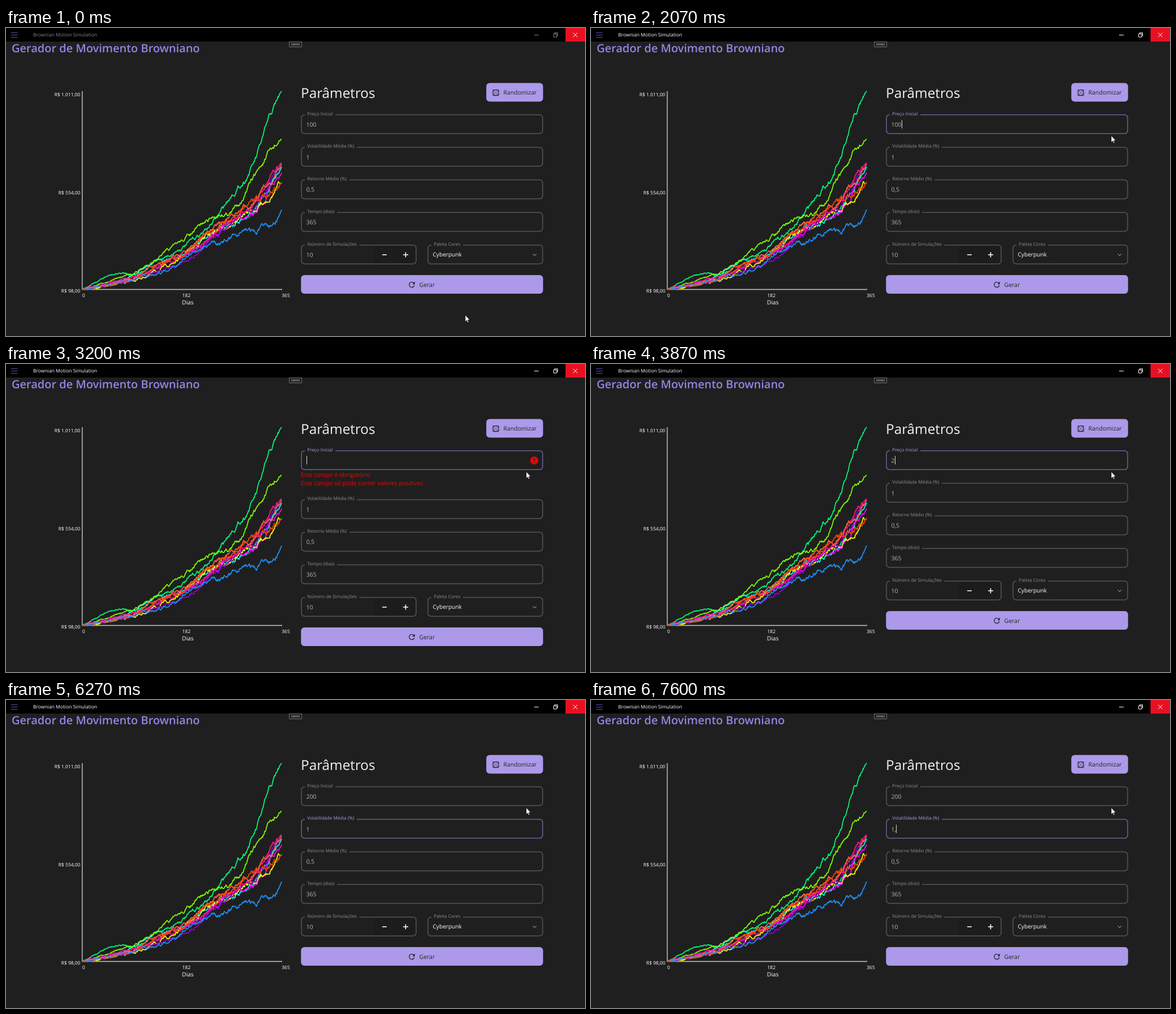
An HTML page for the animation above (8000 ms loop, 1025 px wide and 546 px high).

```html
<!DOCTYPE html>
<html lang="pt">
<head>
<meta charset="utf-8">
<title>Brownian Motion Simulation</title>
<style>
  html, body { margin: 0; width: 100%; height: 100%; overflow: hidden; background: #1f1f1f; }
  svg { display: block; width: 100vw; height: 100vh; font: 10.5px "Open Sans", "Noto Sans", sans-serif; text-rendering: geometricPrecision; }
  .axis { font-size: 8.5px; fill: #fff; }
  .end { text-anchor: end; }
  .label { font-size: 8.1px; fill: #8f8f8f; }
  .value { fill: #b4b4b4; }
  .box { fill: none; stroke: #555; stroke-width: 1.5; }
  .focus .box { stroke: #6c6095; }
  .focus .label { fill: #ac99ea; }
  .error { fill: #f00; }
  .line { fill: none; stroke-width: 1.7; stroke-linejoin: round; }
  .button { fill: #ac99ea; }
  .dark { fill: #242424; }
</style>
</head>
<body>
<svg viewBox="0 0 1025 546">
  <rect width="1025" height="546" fill="#1f1f1f"/>
  <rect width="1025" height="24"/>
  <path d="M9 8.5H20.5M9 12.5H20.5M9 16.5H20.5" stroke="#6650b0" stroke-width="1.1"/>
  <text id="caption" x="48" y="15" font-size="8.55">Brownian Motion Simulation</text>
  <g id="controls" fill="none">
    <path d="M935 12.5H943"/>
    <path d="M969.5 10.5H975V16H969.5ZM971 10V8.5H976.5V14H975.5"/>
  </g>
  <rect x="990.5" width="34.5" height="24" fill="#e81123"/>
  <path d="M1004 8.5L1011.5 16M1011.5 8.5L1004 16" stroke="#fff"/>
  <rect x="501.5" y="24.5" width="22" height="9" fill="#1f1f1f" stroke="#707070"/>
  <rect x="505" y="27" width="15" height="4" fill="#585858"/>
  <text x="10" y="43" font-size="20" font-weight="600" fill="#9880e5">Gerador de Movimento Browniano</text>

  <path d="M135 112V464M134.5 463.5H489" stroke="#c8c8c8" stroke-width="1.4"/>
  <g id="chart"></g>
  <g class="axis">
    <g class="end">
      <text x="131.5" y="121">R$ 1.011,00</text>
      <text x="131.5" y="294.5">R$ 554,00</text>
      <text x="131.5" y="468.5">R$ 98,00</text>
    </g>
    <text x="135" y="477">0</text>
    <text x="312" y="477">182</text>
    <text x="488" y="477">365</text>
    <text x="311.5" y="489.5" font-size="10.2">Dias</text>
  </g>

  <text x="522" y="123.7" font-size="24.3" fill="#f2f2f2">Parâmetros</text>
  <rect class="button" x="850.25" y="97.5" width="100.5" height="33" rx="6"/>
  <rect x="862.2" y="109.7" width="9.8" height="9.8" rx="1" fill="none" stroke="#242424" stroke-width="1.3"/>
  <path d="M864.6 112.1h0M869.6 112.1h0M867.1 114.6h0M864.6 117.1h0M869.6 117.1h0" stroke="#242424" stroke-width="1.8" stroke-linecap="round"/>
  <text class="dark" x="880.5" y="118.3">Randomizar</text>

  <g id="form"></g>
  <g id="submit">
    <rect class="button" x="522.25" y="438" width="428.5" height="33" rx="6"/>
    <path class="dark" transform="translate(710.5 447) scale(.667)" d="M17.65 6.35A7.96 7.96 0 0 0 12 4a8 8 0 1 0 7.73 10h-2.08A6 6 0 1 1 12 6c1.66 0 3.14.69 4.22 1.78L13 11h7V4z"/>
    <text class="dark" x="731.5" y="458.7">Gerar</text>
  </g>

  <g id="errors" class="error">
    <circle cx="935" cy="18" r="7"/>
    <path d="M935 14V19M935 20.6V22.2" stroke="#1f1f1f" stroke-width="1.6"/>
    <text x="522" y="47.2">Este campo é obrigatório</text>
    <text id="rule" x="522" y="61.5"></text>
  </g>
  <rect id="caret" width="1" height="15" fill="#d8d8d8"/>
  <path id="arrow" d="M0 0V11.6L2.6 9.2L4.3 13.2L6.1 12.5L4.4 8.6H8Z" fill="#fff" stroke="#000" stroke-width=".6"/>
  <path id="beam" d="M-3 -7.5H-.7L0 -7L.7 -7.5H3M0 -7V7M-3 7.5H-.7L0 7L.7 7.5H3" fill="none" stroke="#fff"/>
</svg>
<script>
const el = id => document.getElementById(id);

// Price curves: evenly spaced heights, roughened by seeded noise
const curves = {
  '#00ffff': [463, 456, 440, 412, 402, 372, 343, 320, 246],
  '#ff00ff': [463, 456, 444, 425, 404, 378, 341, 328, 256],
  '#ffff00': [463, 458, 450, 431, 408, 368, 345, 320, 275],
  '#00ff7f': [463, 451, 440, 435, 436, 428, 412, 402, 388, 374, 356, 331, 294, 270, 229, 163, 112],
  '#9400d3': [463, 457, 445, 430, 416, 383, 341, 316, 242],
  '#7fff00': [463, 456, 449, 442, 437, 424, 407, 395, 377, 361, 343, 329, 326, 296, 257, 224, 197],
  '#ff1493': [463, 453, 442, 422, 402, 372, 345, 309, 239],
  '#ff6347': [463, 455, 443, 419, 401, 362, 335, 305, 241],
  '#ff4500': [463, 457, 447, 424, 403, 366, 338, 308, 273],
  '#1e90ff': [463, 460, 455, 450, 446, 440, 434, 427, 411, 396, 385, 384, 369, 357, 361, 348, 322]
};
let seed = 7;
const random = () => (seed = seed * 16807 % 2147483647) / 2147483647;

function curvePath(knots) {
  const days = 365, points = [];
  let noise = 0;
  for (let d = 0; d <= days; d++) {
    const p = d / days * (knots.length - 1), k = Math.min(Math.floor(p), knots.length - 2);
    noise = noise * .9 + (random() - .5) * (1 + 6 * d / days);
    const y = knots[k] + (knots[k + 1] - knots[k]) * (p - k) + noise * Math.min(1, (days - d) / 6);
    points.push((135 + 353 * d / days).toFixed(1) + ' ' + Math.min(463, y).toFixed(1));
  }
  return 'M' + points.join('L');
}
el('chart').innerHTML = Object.entries(curves)
  .map(([color, knots]) => `<path class="line" stroke="${color}" d="${curvePath(knots)}"/>`).join('');

// Form fields: label, value, x, row, width, extra parts
const top0 = 153, rowStep = 57.75, shift = 29;
const fields = [
  ['Preço Inicial', '100', 522, 0, 429, ''],
  ['Volatilidade Média (%)', '1', 522, 1, 429, ''],
  ['Retorno Médio (%)', '0,5', 522, 2, 429, ''],
  ['Tempo (dias)', '365', 522, 3, 429, ''],
  ['Número de Simulações', '10', 522, 4, 205,
    '<rect x="129" y="2" width="74" height="31.5" rx="3" fill="#1c1c1c"/><path d="M144 18H152M181 18H190M185.5 13.5V22.5" stroke="#fff" stroke-width="1.6"/>'],
  ['Paleta Cores', 'Cyberpunk', 746, 4, 205,
    '<path d="M186.5 16.5L189.7 19.5L193 16.5" fill="none" stroke="#c4c4c4"/>']
];
el('form').innerHTML = fields.map(([label, value, , , w, extra], i) => `<g>${extra}
  <rect class="box" x="1" y=".75" width="${w - 2}" height="33.5" rx="5.5"/>
  <rect class="gap" x="7" y="-2" height="5" fill="#1f1f1f"/>
  <text class="label" x="11.3" y="1.6">${label}</text>
  <text class="value" x="9.5" y="${i === 5 ? '21.1" style="fill:#fff;font-size:10.1px' : 21.8}">${value}</text></g>`).join('');
const groups = [...el('form').children];
const values = groups.map(g => g.querySelector('.value'));
for (const g of groups)
  g.querySelector('.gap').setAttribute('width', g.querySelector('.label').getComputedTextLength() + 9);

// time, price, volatility, focused field, caret shown, field in error
const states = [
  [0, '100', '1', -1, 0, -1],
  [1670, '100', '1', 0, 1, -1],
  [2870, '10', '1', 0, 1, -1],
  [3000, '1', '1', 0, 1, -1],
  [3200, '', '1', 0, 1, 0],
  [3800, '2', '1', 0, 1, 0],
  [3870, '2', '1', 0, 1, -1],
  [4070, '20', '1', 0, 1, -1],
  [4200, '200', '1', 0, 1, -1],
  [4670, '200', '1', 1, 1, -1],
  [6270, '200', '1', 1, 0, -1],
  [6330, '200', '', 1, 1, 1],
  [7400, '200', '1', 1, 1, 1],
  [7470, '200', '1', 1, 1, -1],
  [7600, '200', '1,', 1, 1, -1]
];
const rules = ['Este campo só pode conter valores positivos', 'Este campo só pode conter valores positivos ou zero'];
const move = (node, x, y) => node.setAttribute('transform', `translate(${x} ${y})`);
const show = (node, on) => node.setAttribute('visibility', on ? 'visible' : 'hidden');

function drawForm([, price, volatility, focus, caret, error]) {
  const rowTop = row => top0 + rowStep * row + (error >= 0 && row > error ? shift : 0);
  values[0].textContent = price;
  values[1].textContent = volatility;
  groups.forEach((g, i) => {
    move(g, fields[i][2], rowTop(fields[i][3]));
    g.setAttribute('class', i === focus ? 'focus' : '');
  });
  move(el('submit'), 0, error >= 0 ? shift : 0);
  show(el('errors'), error >= 0);
  if (error >= 0) {
    move(el('errors'), 0, rowTop(error));
    el('rule').textContent = rules[error];
  }
  show(el('caret'), caret);
  if (caret) {
    const width = values[focus].textContent ? values[focus].getComputedTextLength() : 0;
    move(el('caret'), Math.round(531.5 + width), Math.round(rowTop(focus)) + 10);
  }
}

// The pointer moves in steps of 66 ms
function glide(t, start, count) {
  const p = Math.max(0, Math.min(count, Math.floor((t - start) / 66) + 1)) / count;
  return p * p * (3 - 2 * p);
}

function drawPointer(t) {
  const a = glide(t, 670, 11), b = glide(t, 1670, 7);
  const x = 813 - 235 * a + 343 * b, y = 509 - 334 * a + 16 * b;
  const row = (y - top0) / rowStep;
  const inField = row >= 0 && row < 4 && row % 1 * rowStep < 34;
  move(el('arrow'), x, y);
  move(el('beam'), Math.round(x) + .5, Math.round(y));
  show(el('arrow'), !inField);
  show(el('beam'), inField);
}

let current;
function frame() {
  const t = performance.now() % 8000;
  const state = states.filter(s => s[0] <= t).pop();
  if (state !== current) drawForm(current = state);
  el('caption').setAttribute('fill', t < 1670 ? '#858585' : '#fff');
  el('controls').setAttribute('stroke', t < 1470 ? '#858585' : '#fff');
  drawPointer(t);
  requestAnimationFrame(frame);
}
frame();
</script>
</body>
</html>
```
